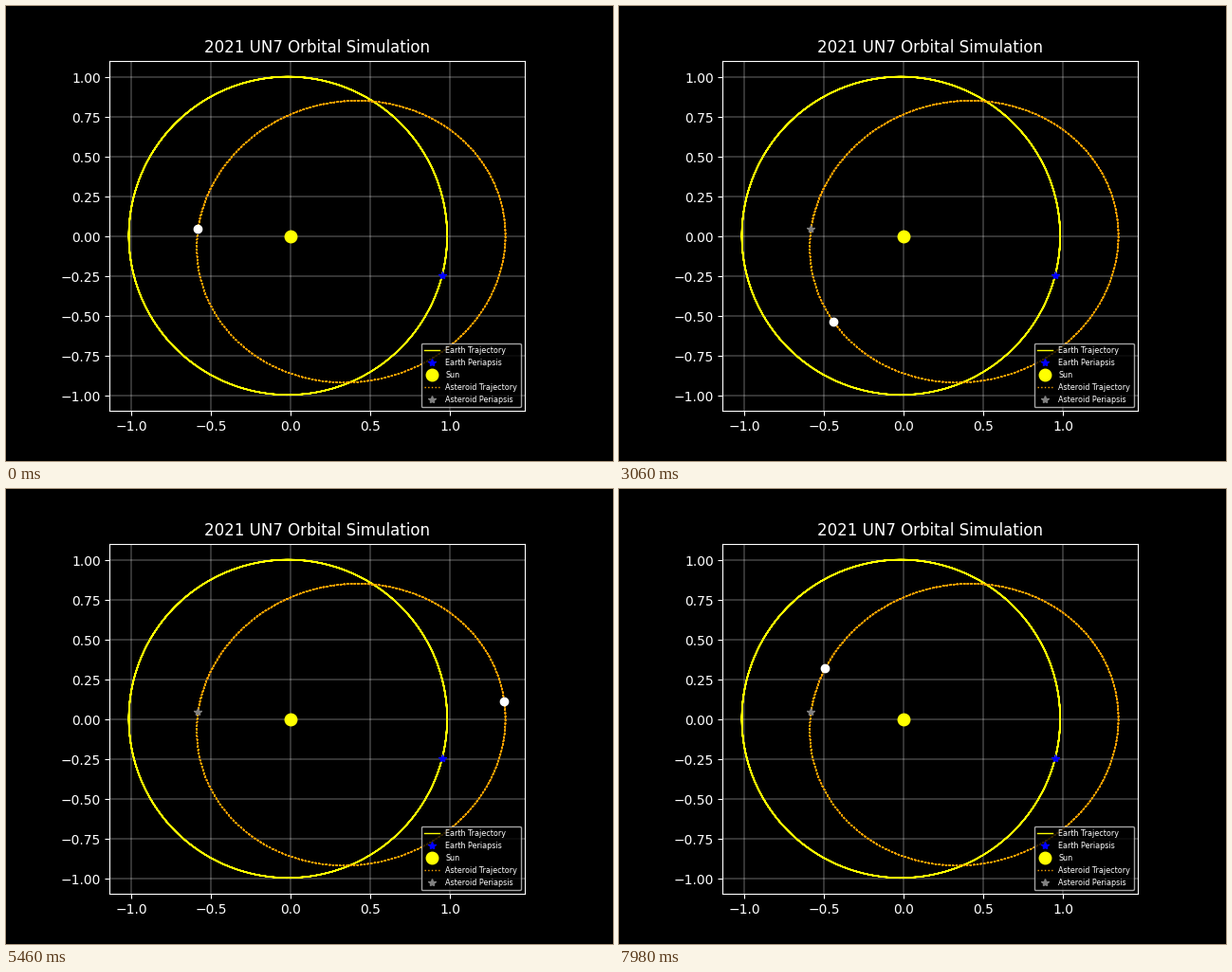
These frames come from a looping animation (640 by 480 pixels, 8 s). A matplotlib script:

```python
import numpy as np
import matplotlib.pyplot as plt
from matplotlib.animation import FuncAnimation

FRAMES = 267
LOOP_MS = 8000
STEPS = 300                      # samples along each drawn trajectory
EARTH_STEP = np.radians(6.9)     # mean anomaly per step
ROCK_STEP = np.radians(6.809)

# Each orbit: eccentricity, projected major and minor half axes
tilt = np.radians(-14.5)
EARTH = (0.0167,
         np.array([np.cos(tilt), np.sin(tilt)]),
         np.array([-np.sin(tilt), np.cos(tilt)]))
ROCK = (0.3937, np.array([-0.9615, 0.0825]), np.array([0.131, 0.882]))


def position(orbit, mean):
    """Solve Kepler's equation and return x, y."""
    ecc, major, minor = orbit
    mean = np.asarray(mean, dtype=float)
    anomaly = mean + ecc * np.sin(mean)
    for _ in range(12):
        anomaly -= ((anomaly - ecc * np.sin(anomaly) - mean)
                    / (1 - ecc * np.cos(anomaly)))
    u, v = np.cos(anomaly) - ecc, np.sin(anomaly)
    return major[0] * u + minor[0] * v, major[1] * u + minor[1] * v


plt.style.use("dark_background")
fig, ax = plt.subplots(figsize=(6.4, 4.8), dpi=100)
ax.set_aspect("equal")
ax.set_title("2021 UN7 Orbital Simulation")
ax.grid(True, color="white", linewidth=0.3)

steps = np.arange(STEPS)


def mark(point, shape, color, label=None, size=6):
    x, y = point
    return ax.plot([float(x)], [float(y)], shape, color=color,
                   markersize=size, label=label)[0]


ax.plot(*position(EARTH, steps * EARTH_STEP), color="yellow",
        linewidth=1, label="Earth Trajectory")
mark(position(EARTH, 0), "*", "blue", "Earth Periapsis")
mark((0, 0), "o", "yellow", "Sun", size=9)
ax.plot(*position(ROCK, steps * ROCK_STEP), ":", color="orange",
        linewidth=1, label="Asteroid Trajectory")
mark(position(ROCK, 0), "*", "gray", "Asteroid Periapsis")
rock = mark(position(ROCK, 0), "o", "white")

ax.legend(loc="lower right", fontsize="xx-small")


def update(i):
    x, y = position(ROCK, i * ROCK_STEP)
    rock.set_data([float(x)], [float(y)])
    return (rock,)


anim = FuncAnimation(fig, update, frames=FRAMES, interval=LOOP_MS / FRAMES,
                     init_func=lambda: update(0), repeat=True, repeat_delay=0)
plt.show()
```
